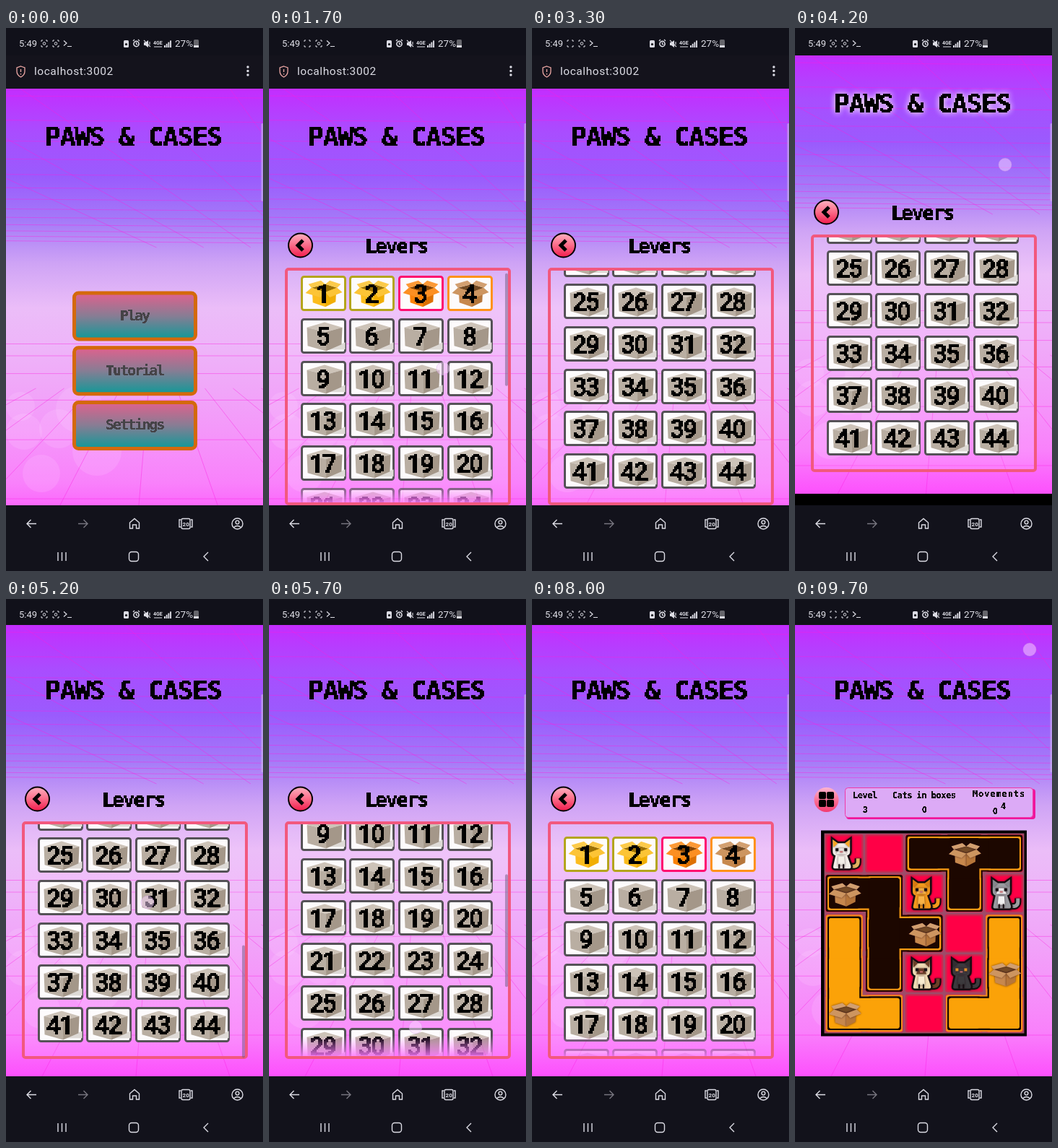
An HTML page with a canvas that plays this animation: 356x752 px, repeating every 9.8 s.

```html
<!DOCTYPE html>
<html lang="en">
<head>
<meta charset="utf-8">
<title>Puzzle game on a phone</title>
<style>
html, body { margin: 0; width: 100%; height: 100%; overflow: hidden; background: #000; }
canvas { display: block; }
</style>
</head>
<body>
<canvas id="stage" width="356" height="752"></canvas>
<script>
const W = 356, H = 752, LOOP = 9800, BAR = 46, NAV_TOP = 661;
const MAX_SCROLL = 351, ROW = 58.7, COLUMN = 67.8, LIST_H = 329;
const newCanvas = (w, h) => Object.assign(document.createElement('canvas'), { width: w, height: h });
const screenCtx = document.getElementById('stage').getContext('2d');
const layerCtx = newCanvas(W, H).getContext('2d');
let g = screenCtx;

// ---------- helpers ----------
const ramp = (t, start, end) => Math.min(1, Math.max(0, (t - start) / (end - start)));
const smooth = (t, start, end) => {
  const k = ramp(t, start, end);
  return k * k * (3 - 2 * k);
};
const pulse = (t, start, end) => ramp(t, start, start + 100) - ramp(t, end, end + 300);

function rect(color, x, y, w, h) {
  g.fillStyle = color;
  g.fillRect(x, y, w, h);
}

function rounded(x, y, w, h, r, fill, line, width = 1) {
  g.beginPath();
  g.roundRect(x, y, w, h, r);
  if (fill) { g.fillStyle = fill; g.fill(); }
  if (line) { g.strokeStyle = line; g.lineWidth = width; g.stroke(); }
}

function circle(x, y, r, fill, line, width) {
  rounded(x - r, y - r, 2 * r, 2 * r, r, fill, line, width);
}

function fill(path, color) {
  g.fillStyle = color;
  g.fill(new Path2D(path));
}

function stroke(path, color, width = 1.4) {
  g.strokeStyle = color;
  g.lineWidth = width;
  g.stroke(new Path2D(path));
}

// Vertical gradient with evenly spaced colours.
function vertical(y0, y1, ...colors) {
  const grad = g.createLinearGradient(0, y0, 0, y1);
  colors.forEach((color, i) => grad.addColorStop(i / (colors.length - 1), color));
  return grad;
}

function at(x, y, scale, draw) {
  g.save();
  g.translate(x, y);
  g.scale(scale, scale);
  draw();
  g.restore();
}

function label(str, x, y, size, color, spacing = 0, weight = 400) {
  g.font = `${weight} ${size}px Roboto, sans-serif`;
  g.letterSpacing = spacing + 'px';
  g.fillStyle = color;
  g.fillText(str, x, y);
}

// Hard-edged lettering: set small, thresholded, then enlarged k times.
const wordCache = new Map();
function pixelWord(str, size, spacing, color, k) {
  const key = [str, size, color].join('|');
  if (!wordCache.has(key)) {
    const family = isNaN(str) ? '"DejaVu Sans Mono", monospace' : 'Roboto, sans-serif';
    const p = newCanvas(1, 1).getContext('2d');
    const setFont = () => {
      p.font = `bold ${size / k}px ${family}`;
      p.letterSpacing = spacing / k + 'px';
    };
    setFont();
    p.canvas.width = Math.ceil(p.measureText(str).width - spacing / k) + 2;
    p.canvas.height = Math.ceil(size * 1.3 / k);
    setFont();
    p.fillStyle = color;
    p.fillText(str, 1, Math.round(size / k));
    const image = p.getImageData(0, 0, p.canvas.width, p.canvas.height);
    for (let i = 3; i < image.data.length; i += 4) image.data[i] = image.data[i] > 95 ? 255 : 0;
    p.putImageData(image, 0, 0);
    wordCache.set(key, p.canvas);
  }
  return wordCache.get(key);
}

function pixelText(str, cx, baseline, size, spacing = 0, color = '#000', k = 2) {
  const word = pixelWord(str, size, spacing, color, k);
  g.imageSmoothingEnabled = false;
  g.drawImage(word, Math.round(cx - word.width * k / 2), Math.round(baseline - size), word.width * k, word.height * k);
}

// ---------- phone ----------
const INK = '#dcdce4', DARK = '#11111a';

function statusBar(t) {
  rect(DARK, 0, 0, W, 38);
  label('5:49', 18, 26, 13, INK);
  for (const x of [53, 69]) {
    stroke(`M${x - 4} 19v-2h2m4 0h2v2m0 5v2h-2m-4 0h-2v-2`, INK, 1);
    if (x > 60 || t % 1000 < 300) circle(x, 21.5, 1.8, null, INK);
  }
  stroke('M80 17.5l4 3.5l-4 3.5m5 1h6', INK, 1.2);
  rounded(163, 17, 7, 10, 1.5, INK);
  circle(166.5, 22.5, 1.6, DARK);
  circle(180.5, 22, 3.6, null, INK, 1.6);
  stroke('M176 18l2-2m7 2l-2-2m-2.5 4v2.5h2', INK, 1.2);
  fill('M191 20h2l4-3v10l-4-3h-2z', INK);
  stroke('M191 17l9 9m-1-7v4', INK, 1.1);
  label('4GE', 204, 23, 7, INK, 0, 700);
  stroke('M205 26h11', INK, 1);
  for (let i = 0; i < 4; i++) rect(INK, 219 + i * 2.7, 24 - i * 2.2, 1.9, 3 + i * 2.2);
  label('27%', 234, 26, 13.5, INK);
  rounded(260, 16, 7, 11, 1.5, '#66666c');
  rect(INK, 260, 24, 7, 3);
}

function addressBar() {
  rect('#14131c', 0, 38, W, BAR);
  stroke('M20.5 53l5.5 2v5q0 5-5.5 8q-5.5-3-5.5-8v-5zm0 4v4m0 2v1.4', '#efa9a6', 1.3);
  label('localhost:3002', 39, 65, 15.5, INK, 0.55);
  for (let i = 0; i < 3; i++) circle(335, 54 + i * 5.5, 1.7, INK);
}

function navigation() {
  rect('#12121b', 0, NAV_TOP, W, H - NAV_TOP);
  stroke('M42 686.5h-13m5.5-5.5l-5.5 5.5l5.5 5.5', INK);
  stroke('M100 686.5h13m-5.5-5.5l5.5 5.5l-5.5 5.5', '#77767f');
  stroke('M171.5 685l6.5-5.5l6.5 5.5v8h-4v-5h-5v5h-4z', INK);
  rounded(243, 679.5, 12, 14, 2, null, INK, 1.4);
  stroke('M242 681h-2v10h2m14-10h2v10h-2', INK);
  label('20', 244.6, 689.7, 8, INK, 0, 700);
  circle(320.5, 686.5, 7.5, null, INK, 1.4);
  circle(320.5, 684.5, 2.4, null, INK, 1.4);
  stroke('M315.5 691.5q5-4 10 0', INK);
  stroke('M72 726v12m5.5-12v12m5.5-12v12', INK);
  rounded(170.5, 725.5, 13, 13, 3.5, null, INK, 1.4);
  stroke('M280 726l-6 6l6 6', INK);
}

// ---------- scenery ----------
function backdrop(top, height) {
  at(0, top, 1, () => {
    g.beginPath();
    g.rect(0, 0, W, height);
    g.clip();
    rect(vertical(0, height, '#c42dff', '#a94dff', '#9a5bfd', '#a47af8', '#cfa4f5', '#ebbdf8',
      '#eeb3f9', '#f1a4f9', '#f594fa', '#f981fb', '#fd50fd'), 0, 0, W, height);
    for (let i = 0; i < 6; i++)
      circle(20 + i * 53 % 130, 440 + i * 31 % 120, 20 + i * 7 % 15, 'rgba(255,225,255,.14)');
    g.beginPath();
    for (let i = 0; i < 13; i++) {
      const y = 250 - 240 * 0.86 ** i;
      g.moveTo(0, y);
      g.lineTo(W, y + 3);
    }
    for (let i = 0; i < 6; i++) {
      const y = 320 + 248 * 0.67 ** i;
      g.moveTo(0, y);
      g.lineTo(W, y);
    }
    // Two fans of rays, each towards its own vanishing point.
    for (let i = 0; i < 5; i++) {
      const x = i * 145 - 270;
      g.moveTo(x, 0);
      g.lineTo(x + (600 - x) * 0.55, 220);
    }
    for (let i = 0; i < 9; i++) {
      const x = i * 130 - 340;
      g.moveTo(x, 625);
      g.lineTo(x + (205 - x) * 0.7, 415);
    }
    g.strokeStyle = 'rgba(250,30,225,.42)';
    g.lineWidth = 1;
    g.stroke();
  });
}

function title(y, t) {
  const glow = Math.max(0, Math.sin(t * Math.PI / 1000));
  g.save();
  g.shadowColor = `rgba(255,255,255,${glow})`;
  g.shadowBlur = 9;
  pixelText('PAWS & CASES', 178, y, 37, -1.9);
  pixelText('PAWS & CASES', 178, y, 37, -1.9);
  g.restore();
}

// ---------- menu ----------
function menu() {
  ['Play', 'Tutorial', 'Settings'].forEach((name, i) => {
    const y = 365 + i * 75.7;
    rounded(94.5, y + 2, 168, 64, 6, vertical(y, y + 68, '#e65f8d', '#877d94', '#089b98'), '#d4690b', 5);
    pixelText(name, 179, y + 40, 20, -2, '#454347', 1);
  });
}

// ---------- boxes ----------
function closedBox() {
  fill('M6 18L29 8V18z', '#dedad6');
  fill('M-23-12L1-19L25-12L3-6z', '#cdc3b8');
  fill('M-23-12L3-6V20L-22 13z', '#b9aea2');
  fill('M3-6L25-12L24 11L3 20z', '#a49789');
}

function openBox(hue, sat, light) {
  const shade = step => `hsl(${hue} ${sat}% ${light + step}%)`;
  fill('M-17-8L2-13L18-8L2-2z', shade(-24));
  fill('M-16-8L2-2V18L-15 12z', shade(0));
  fill('M2-2L17-8L16 11L2 18z', shade(-7));
  fill('M-17-8L2-13L-4-18L-21-13zM2-13L18-8L23-13L8-18z', shade(9));
  fill('M-17-8L2-2L-5 5L-25-1zM18-8L2-2L8 5L25-2z', shade(5));
}

const yellowBox = () => openBox(43, 97, 55);
const orangeBox = () => openBox(30, 97, 51);
const tanBox = () => openBox(29, 52, 54);
const unlocked = [[yellowBox, '#b4a51c'], [yellowBox, '#b4a51c'], [orangeBox, '#ff0d70'], [tanBox, '#ff9218']];

// ---------- level list ----------
function levelCell(n, x, y) {
  const [box, border] = unlocked[n - 1] || [closedBox, '#555257'];
  rounded(x + 1.5, y + 1.5, 60, 46, 3, '#fdfbfc', border, 3);
  at(x + 32, y + 25, 1.02, box);
  pixelText(String(n), x + 32, y + 37, 35, -2);
}

function roundButton(y) {
  circle(43.5, y, 16.5, vertical(y - 17, y + 17, '#ffb3c2', '#fb6b88', '#f0184a'), '#000', 2);
}

function levels(y, t, scroll) {
  const top = y + 249, bottom = top + LIST_H;
  roundButton(y + 218);
  stroke(`M47 ${y + 211}l-7 7l7 7`, '#000', 5);
  pixelText('Levers', 178, y + 228, 27, -1.8);
  rounded(24, top + 2, 309, LIST_H - 4, 3, 'rgba(255,235,255,.14)', '#f2587e', 4);

  g = layerCtx;
  g.clearRect(0, 0, W, H);
  g.save();
  g.beginPath();
  g.rect(26, top + 4, 305, LIST_H - 8);
  g.clip();
  for (let i = 0; i < 44; i++) {
    const cellY = Math.round(top + 21 + Math.floor(i / 4) * ROW - scroll);
    if (cellY > top - 60 && cellY < bottom) levelCell(i + 1, Math.round(43.5 + i % 4 * COLUMN), cellY);
  }
  if (scroll < MAX_SCROLL) {
    g.globalCompositeOperation = 'destination-in';
    rect(vertical(bottom - 32, bottom, '#000', 'transparent'), 0, 0, W, H);
  }
  g.restore();
  g = screenCtx;
  g.drawImage(layerCtx.canvas, 0, 0);

  const thumb = pulse(t, 1600, 2900) + pulse(t, 5100, 6600);
  rounded(327, top + 3 + scroll * 0.48, 4, 156, 2, `rgba(110,90,125,${thumb / 2})`);
}

// ---------- game ----------
// Letters are joined floor pieces, capitals hold a box, digits are cats.
const board = ['0.aAa', 'Bb1a2', 'cbB.d', 'cb34D', 'Cc.dd'];
const CELL = 55.4, BOARD_X = 40.5, BOARD_Y = 324.5;
const cellX = c => BOARD_X + c * CELL, cellY = r => BOARD_Y + r * CELL;
const pieceAt = (c, r) => (board[r]?.[c] || '').toLowerCase();
const darkFloor = ['#220500', '#f99c12', '#1c0700'];
const brightFloor = ['#f58a1c', '#140400', '#fba208'];

function eachCell(visit) {
  board.forEach((row, r) => [...row].forEach((mark, c) => visit(mark, c, r)));
}

function floorLayer(layer) {
  const inset = 2.3 + layer * 2.2;
  eachCell((mark, c, r) => {
    const id = pieceAt(c, r);
    if (!/[a-d]/.test(id)) return;
    const color = (id < 'c' ? darkFloor : brightFloor)[layer];
    for (const [dc, dr] of [[0, 0], [1, 0], [0, 1]])
      if (pieceAt(c + dc, r + dr) === id)
        rounded(cellX(c) + inset, cellY(r) + inset, (1 + dc) * CELL - 2 * inset, (1 + dr) * CELL - 2 * inset, 3, color);
  });
}

const cats = [
  { fur: '#f3efe8', ears: '#f5a526', tail: '#e0b060' },
  { fur: '#f39a1c', ears: '#d97b10', face: '#f8b347' },
  { fur: '#9a9ca0', ears: '#85878c', face: '#f1f1f1' },
  { fur: '#f0dcb4', ears: '#6b4028', face: '#6b4028', belly: '#f8ecd2', tail: '#6b4028' },
  { fur: '#3c3a3d', ears: '#302e31', eye: '#e2902a' }
];

function cat({ fur, ears, face = fur, belly = face, tail = fur, eye = '#171014' }) {
  const ink = '#140d10', tailPath = 'M4 17h8q5-1 5-6v-5';
  const body = 'M-18-20l7 5h10l7-5v16q0 5-4 6l5 14q1 4-2 4h-20q-3 0-2-4l3-14q-4-1-4-6z';
  stroke(tailPath, ink, 9);
  stroke(tailPath, tail, 5);
  stroke(body, ink, 5);
  fill(body, fur);
  fill('M-18-20l7 5l-6 6zM6-20l-7 5l6 6z', ears);
  fill('M-10-8h8l3 8h-14z', face);
  fill('M-10 3h8l1 12h-10z', belly);
  for (const x of [-14, -2]) rect(eye, x, -8, 4, 4);
  rect('#c96c70', -8, -4, 4, 2);
  stroke('M-9 14v6m6-6v6', ink, 2);
}

function game() {
  circle(43.5, 278, 17, vertical(261, 295, '#ffb5d0', '#fa7297', '#f23a70'));
  for (const x of [33, 44]) for (const y of [267, 278]) rounded(x, y, 10, 10, 2, '#000');

  rounded(71, 263, 262, 42, 4, '#f0149c');
  rounded(69.5, 261.5, 260, 41, 4, '#dcaaf6', '#f03aa8');
  const stat = (str, x, y, spacing = -0.5) => pixelText(str, x, y, 12, spacing, '#111', 1);
  stat('Level', 97, 276);
  stat('3', 97, 296);
  stat('Cats in boxes', 179, 276);
  stat('0', 179, 296);
  stat('Movements', 282, 274, 0.9);
  stat('0', 277, 298);
  stat('4', 288, 291);

  rect('#000', 36, 320.5, 285, 285);
  rect('#9f4a68', BOARD_X, BOARD_Y, CELL * 5, CELL * 5);
  eachCell((mark, c, r) => {
    rounded(cellX(c) + 1.5, cellY(r) + 1.5, CELL - 3, CELL - 3, 3, '#d0244f');
    rounded(cellX(c) + 4, cellY(r) + 4, CELL - 8, CELL - 8, 3, '#ff0046');
  });
  for (let layer = 0; layer < 3; layer++) floorLayer(layer);
  g.save();
  g.shadowColor = 'rgba(30,0,10,.6)';
  g.shadowBlur = 3;
  eachCell((mark, c, r) => {
    const x = cellX(c) + CELL / 2, y = cellY(r) + CELL / 2;
    if (/[A-D]/.test(mark)) at(x + 1, y + 2, 0.9, tanBox);
    if (mark in cats) at(x + 2, y + 1, 1, () => cat(cats[mark]));
  });
  g.restore();
}

// ---------- timeline ----------
function touch(t, start, end, x, y, dx = 0, dy = 0, alpha = 0.5) {
  if (t < start || t > end) return;
  const k = ramp(t, start, end);
  circle(x + dx * k, y + dy * k, 9, `rgba(250,215,255,${alpha})`, 'rgba(205,150,225,.35)');
}

function draw(t) {
  const compact = t >= 4400;
  const slide = BAR * smooth(t, 3900, 4200);
  const pageTop = compact ? 36 : 84 - slide;
  const contentY = compact ? 59 : pageTop - 1;
  rect('#000', 0, 0, W, H);
  backdrop(pageTop, compact ? 625 : 607);
  title(contentY + 79, t);
  if (t < 1000) menu();
  else if (t < 8700) levels(contentY, t, MAX_SCROLL * (smooth(t, 1600, 2600) - smooth(t, 5200, 6100)));
  else game();
  rounded(353.5, 132, 3, 108, 1.5, 'rgba(205,185,235,.6)');

  touch(t, 700, 900, 182, 402);
  touch(t, 1600, 2300, 237, 497, 28, -177);
  touch(t, 3900, 4300, 288, 235, 4, -61);
  touch(t, 5200, 5700, 196, 420, 7, 173);
  touch(t, 8300, 8500, 211, 357);
  touch(t, 9500, 9800, 325, 70);

  if (slide < BAR) at(0, -slide, 1, addressBar);
  g.save();
  g.beginPath();
  g.rect(0, 0, W, compact ? 36 : 38);
  g.clip();
  statusBar(t);
  g.restore();
  navigation();
}

function tick() {
  draw(Math.floor(performance.now() % LOOP / 100) * 100);
  requestAnimationFrame(tick);
}
tick();
</script>
</body>
</html>
```
